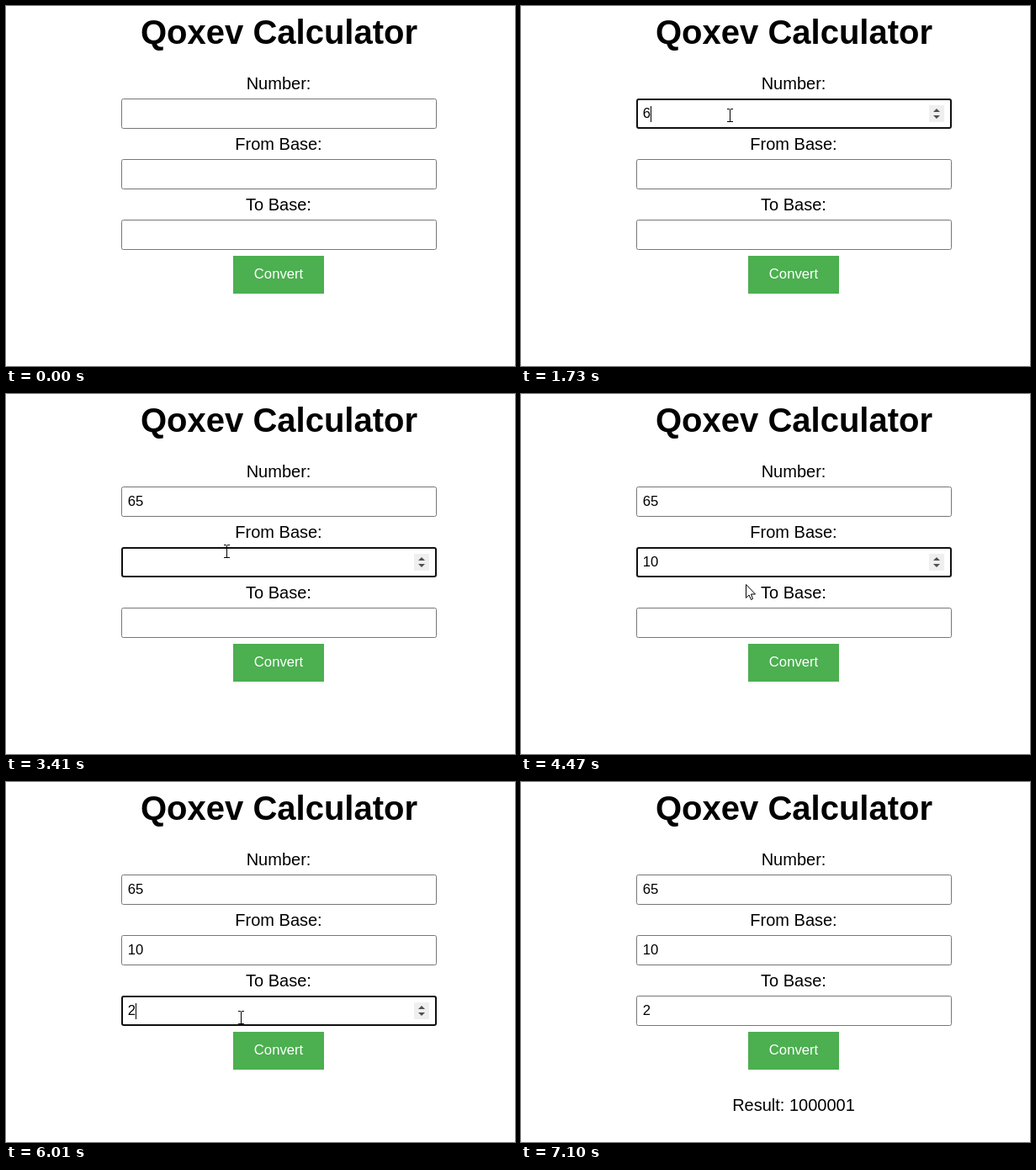
These frames come from a looping animation (605x428 px, 7.7 s). An HTML page with a canvas:

```html
<!DOCTYPE html>
<html lang="en">
<head>
<meta charset="utf-8">
<title>Qoxev Calculator</title>
<style>
html, body { margin: 0; width: 605px; height: 428px; overflow: hidden; background: #fff; }
canvas { display: block; }
</style>
</head>
<body>
<canvas width="605" height="428"></canvas>
<script>
const ctx = document.querySelector('canvas').getContext('2d');
const LOOP = 7700, BLINK = 530, CENTER = 324;
const BLUR = 6510, RESULT = 6570, LEAVE = 7100;

const fields = [
  { label: 'Number:', y: 110, text: '65', focus: 930, keys: [1730, 1930] },
  { label: 'From Base:', y: 182, text: '10', focus: 2880, keys: [3610, 3740] },
  { label: 'To Base:', y: 254, text: '2', focus: 4890, keys: [5550] },
];
fields.forEach((f, i) => f.blur = fields[i + 1]?.focus ?? BLUR);

// Pointer moves: start, end, number of steps, target x, y
const moves = [
  [70, 400, 6, 262, 156],
  [550, 790, 4, 248, 130],
  [2480, 2680, 4, 262, 187],
  [4260, 4820, 9, 274, 275],
  [6010, 6440, 7, 312, 311],
  [6970, 7035, 2, 349, 370],
];
const clicks = [[930, 1000], [2880, 3010], [4890, 4950], [6510, 6640]];

const arrow = new Path2D('M.5 .5V16.5L4 13L6.5 18.5L8.5 17.5L6.5 12H11.5Z');
const hand = new Path2D('M-2 13V2a2 2 0 0 1 4 0V7q2.4-1 2.4 1q2.4-1 2.4 1q2.4-1 2.4 1V15L7.5 22.5H-1L-5.5 14q-1-3 1-3q1 0 2.5 2Z' +
  'M2 7v4M4.4 8v4M6.8 9v3');

function text(str, x, y, size, { color = '#000', align = 'center', weight = 'normal' } = {}) {
  ctx.font = `${weight} ${size}px "Liberation Sans", Arial, sans-serif`;
  ctx.textAlign = align;
  ctx.fillStyle = color;
  ctx.fillText(str, x, y);
}

function rect(color, x, y, w, h) {
  ctx.fillStyle = color;
  ctx.fillRect(x, y, w, h);
}

function frame(color, width, x, y, w, h, radius) {
  const d = width / 2;
  ctx.beginPath();
  ctx.roundRect(x + d, y + d, w - width, h - width, radius);
  ctx.strokeStyle = color;
  ctx.lineWidth = width;
  ctx.stroke();
}

function pointerAt(t) {
  if (t < moves[0][0] || t >= LEAVE) return null;
  let x = 572, y = 420;
  for (const [start, end, steps, toX, toY] of moves) {
    if (t < start) break;
    const step = Math.floor((t - start) / (end - start) * (steps - 1) + 1e-6);
    const k = Math.min(1, (step + 1) / steps);
    x += (toX - x) * k;
    y += (toY - y) * k;
  }
  return { x: Math.round(x), y: Math.round(y) };
}

const inside = (p, x, y, w, h) => p && p.x >= x && p.x < x + w && p.y >= y && p.y < y + h;
const overField = (p, f) => inside(p, 137, f.y, 375, 36);

function drawSpinner(y) {
  rect('#efefef', 485, y + 8, 18, 20);
  ctx.fillStyle = '#505050';
  for (const [base, tip] of [[16, 12], [20, 24]]) {
    ctx.beginPath();
    ctx.moveTo(490, y + base);
    ctx.lineTo(498, y + base);
    ctx.lineTo(494, y + tip);
    ctx.fill();
  }
}

function drawField(f, t, pointer) {
  const focused = t >= f.focus && t < f.blur;
  const hovered = overField(pointer, f);
  const typed = f.keys.filter(k => t >= k);
  text(f.label, CENTER, f.y - 11, 20);
  if (focused) frame('#101010', 2, 137, f.y, 375, 36, 2);
  else frame(hovered ? '#4f4f4f' : '#767676', 1, 137, f.y, 375, 36, 2);
  if (focused || hovered) drawSpinner(f.y);
  text(f.text.slice(0, typed.length), 144.7, f.y + 23, 16.67, { align: 'left' });
  const lastInput = typed.at(-1) ?? f.focus;
  if (focused && (t - lastInput) % (2 * BLINK) < BLINK)
    rect('#000', Math.floor(145 + 9.27 * typed.length), f.y + 9, 1, 19);
}

function drawPointer(p) {
  if (fields.some(f => overField(p, f))) {
    rect('#000', p.x, p.y - 7, 1, 15);
    for (const y of [p.y - 8, p.y + 7]) {
      rect('#000', p.x - 3, y, 3, 1);
      rect('#000', p.x + 1, y, 3, 1);
    }
    return;
  }
  const shape = inside(p, 270, 297, 108, 45) ? hand : arrow;
  ctx.save();
  ctx.translate(p.x, p.y);
  ctx.fillStyle = '#fff';
  ctx.strokeStyle = '#000';
  ctx.lineWidth = 1;
  ctx.fill(shape);
  ctx.stroke(shape);
  ctx.restore();
}

function draw(t) {
  const pointer = pointerAt(t);
  rect('#fff', 0, 0, 605, 428);
  text('Qoxev Calculator', CENTER + 0.5, 45, 40, { weight: 'bold' });
  for (const f of fields) drawField(f, t, pointer);
  rect('#4caf50', 270, 297, 108, 45);
  text('Convert', CENTER, 324, 16.67, { color: '#fff' });
  if (t >= RESULT) text('Result: 1000001', CENTER, 391, 20);
  if (!pointer) return;
  if (clicks.some(([on, off]) => t >= on && t < off)) {
    ctx.fillStyle = 'rgba(255, 245, 0, 0.5)';
    ctx.beginPath();
    ctx.arc(pointer.x - 2, pointer.y - 1, 15, 0, 2 * Math.PI);
    ctx.fill();
  }
  drawPointer(pointer);
}

function tick() {
  draw(performance.now() % LOOP);
  requestAnimationFrame(tick);
}
tick();
</script>
</body>
</html>
```
